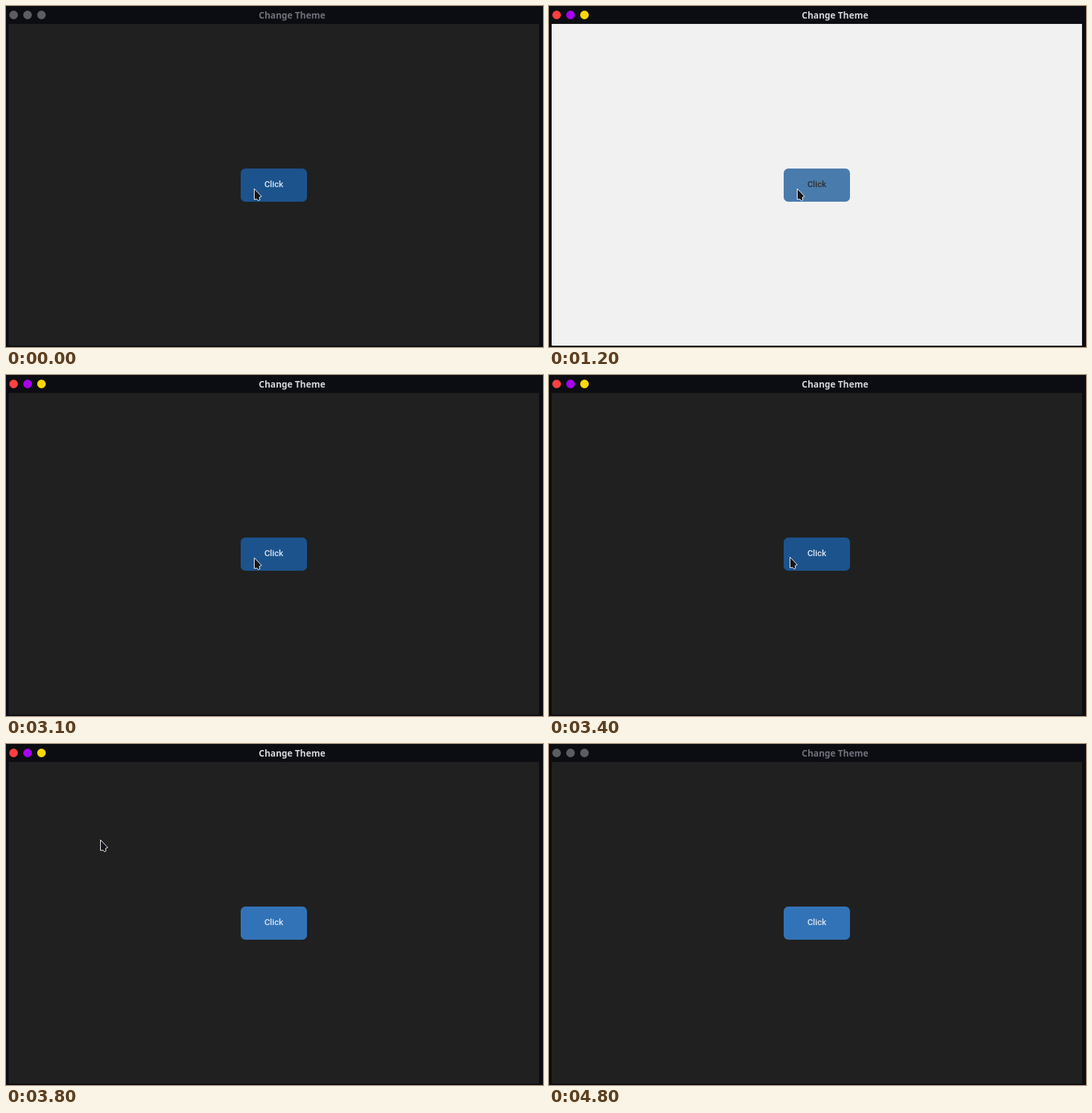
Animation, 810 px wide and 514 px high, one loop 4900 ms. Source, as an HTML page:

```html
<!DOCTYPE html>
<html lang="en">
<head>
<meta charset="utf-8">
<title>Change Theme</title>
<style>
  html, body { margin: 0; width: 100%; height: 100%; overflow: hidden; background: #0c0d12; }
  svg { display: block; width: 810px; height: 514px; }
  .title { font: 600 13.5px "Noto Sans", sans-serif; text-anchor: middle; }
  .label { font: 500 13px Roboto, sans-serif; text-anchor: middle; }
  .code { font: 13.33px "Noto Sans Mono", monospace; fill: #b9d9dc; white-space: pre; }
  .punct { fill: #9aa9b5; }
  .quote { fill: #7cc8c4; }
  .string { fill: #6cc7f6; }
</style>
</head>
<body>
<svg viewBox="0 0 810 514">
  <rect width="810" height="514" fill="#0c0d12"/>
  <rect id="page" x="4" y="27" width="800" height="485"/>
  <g id="bar">
    <circle cx="11.5" cy="13.5" r="6.5"/>
    <circle cx="32.5" cy="13.5" r="6.5"/>
    <circle cx="53.5" cy="13.5" r="6.5"/>
    <text id="title" class="title" x="431.5" y="19">Change Theme</text>
  </g>
  <g id="editor">
    <rect width="810" height="78" fill="#13181f"/>
    <rect y="78" width="810" height="2" fill="#0d1015"/>
    <text class="code" x="0.5" y="42">e_mode<tspan class="punct">(</tspan>DARK_MODE<tspan class="punct">)</tspan></text>
    <text class="code" x="0.5" y="61">olor_theme<tspan class="punct">(</tspan><tspan class="quote">"</tspan><tspan class="string">blue</tspan><tspan class="quote">"</tspan><tspan class="punct">)</tspan></text>
  </g>
  <rect id="button" x="354" y="245" width="100" height="50" rx="7"/>
  <text id="label" class="label" x="404" y="273">Click</text>
  <path id="cursor" d="M.5 .5 L11.5 12 L8 13.5 L9 17 L6.5 18.5 L4.5 16 L.5 16.5 Z"
        fill="#12151c" stroke="#fff" stroke-linejoin="round"/>
</svg>
<script>
const LOOP = 4900;
const themes = {
  dark: { page: "#202020", idle: "#3273b8", hover: "#1c538d", text: "#dce4ee" },
  light: { page: "#f1f1f1", idle: "#5b97d3", hover: "#4a7bad", text: "#303030" }
};
const dotColors = ["#ff4040", "#a800f0", "#ffd60a"];

// start time, cursor tip
const path = [
  [0, 374, 275], [3400, 363, 274], [3500, 318, 252], [3600, 252, 214],
  [3700, 190, 177], [3800, 142, 144], [3900, 123, 108], [4000, 122, 104],
  [4100, 118, 88], [4200, 111, 63], [4300, 101, 34], [4400, 89, 4]
];

const $ = id => document.getElementById(id);
const dots = document.querySelectorAll("circle");
const paint = (el, color) => el.setAttribute("fill", color);
const show = (el, on) => el.setAttribute("visibility", on ? "visible" : "hidden");
const within = (t, from, to) => t >= from && t < to;

function draw(t) {
  const theme = themes[within(t, 1100, 3000) ? "light" : "dark"];
  const hover = t < 3500 && !within(t, 1100, 1200) && !within(t, 3000, 3100);
  const active = within(t, 1100, 4800);

  paint($("page"), theme.page);
  paint($("button"), hover ? theme.hover : theme.idle);
  paint($("label"), theme.text);
  paint($("title"), active ? "#d2d4d8" : "#6e717b");
  dots.forEach((dot, i) => paint(dot, active ? dotColors[i] : "#5c5d61"));

  const coding = within(t, 1100, 1200);
  show($("editor"), coding);
  show($("bar"), !coding);

  const [, x, y] = path.findLast(step => step[0] <= t);
  $("cursor").setAttribute("transform", `translate(${x} ${y})`);
  show($("cursor"), t < 4500);
}

const start = performance.now();
function tick() {
  draw((performance.now() - start) % LOOP);
  requestAnimationFrame(tick);
}
tick();
</script>
</body>
</html>
```
